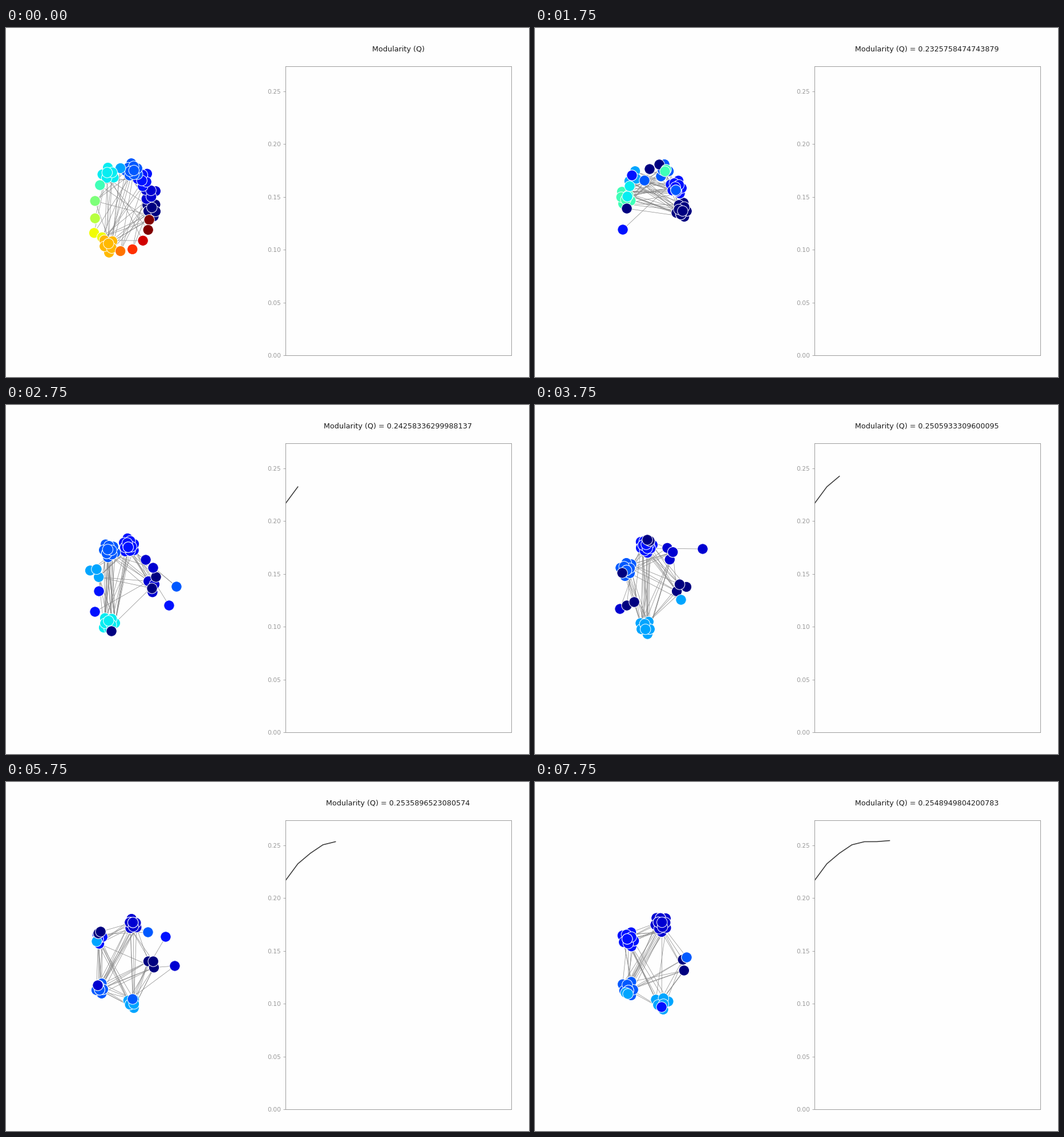
These frames come from a looping animation (917 by 611 pixels, 8 s). A matplotlib script:

```python
import numpy as np
import matplotlib.pyplot as plt
from matplotlib.animation import FuncAnimation
from matplotlib.collections import LineCollection

W, H, DPI = 917, 611, 64
PT = 72 / DPI  # points per pixel
NODES, EDGES = 50, 46
JET = plt.get_cmap("jet")(np.linspace(0, 1, 15))
Q_TEXT = ["0.2164823309600412", "0.2325758474743879", "0.24258336299988137",
          "0.2505933309600095", "0.2535303192120565", "0.2535896523080574",
          "0.25456230814005213", "0.2548949804200783"]
Q = [float(q) for q in Q_TEXT]
KEY_FRAMES = [1, 7, 11, 15, 19, 23, 31]


def blob(slot, slots, count, radius, rng):
    """Points of one community around its place on the ring."""
    angle = 2 * np.pi * slot / slots
    center = np.array([206 + 51 * np.cos(angle), 318 - 73 * np.sin(angle)])
    if count == 1:
        return center[None]
    j = np.arange(count)[::-1]
    r = radius * np.sqrt((j + 0.5) / count)
    turn = 2.4 * j + rng.uniform(0, 2 * np.pi)
    return center + np.column_stack([r * np.cos(turn), 1.15 * r * np.sin(turn)])


class Pose:
    """Community sizes by ring slot, plus nodes (colour, x, y) away from their group."""

    def __init__(self, slots, sizes, strays=(), colors=None, radius=12):
        rng = np.random.default_rng(slots)
        colors = colors or range(len(sizes))
        points, tints = [], []
        for slot, (size, color) in enumerate(zip(sizes, colors)):
            points.extend(blob(slot, slots, size, radius, rng) if size else [])
            tints += [color] * size
        for color, x, y in strays:
            points.append((x, y))
            tints.append(color)
        pick = np.arange(NODES) * len(points) // NODES
        self.xy = np.array(points)[pick]
        self.colors = JET[np.array(tints)[pick]]
        gap = np.linalg.norm(self.xy[:, None] - self.xy, axis=2)
        crowd = sum(sizes) * NODES // len(points)
        far = np.argwhere(np.triu(gap > 60)[:crowd, :crowd])
        self.edges = far[rng.choice(len(far), EDGES, replace=False)]
        links = [(i, rng.integers(crowd)) for i in range(crowd + 1, NODES)]
        if links:
            self.edges = np.vstack([self.edges, links])


POSES = [
    Pose(15, [6, 5, 6, 10, 1, 6, 1, 1, 1, 2, 6, 1, 1, 1, 2]),
    Pose(11, [9, 9, 4, 0, 3, 6],
         [(3, 247, 284), (0, 218, 239), (6, 230, 248), (6, 228, 251), (0, 201, 247),
          (2, 170, 258), (3, 192, 267), (5, 166, 277), (5, 162, 295), (0, 161, 316),
          (2, 154, 353)], colors=[0, 2, 3, 0, 4, 6]),
    Pose(9, [3, 1, 11, 10, 3, 0, 8],
         [(3, 299, 318), (2, 286, 351), (0, 263, 301), (0, 256, 321), (1, 258, 285),
          (2, 163, 326), (2, 156, 362), (0, 185, 396)], colors=[1, 1, 2, 3, 4, 0, 5]),
    Pose(7, [3, 3, 12, 9, 0, 7],
         [(1, 294, 252), (4, 256, 341), (0, 201, 238), (0, 197, 236), (0, 153, 294),
          (1, 149, 357), (0, 161, 351), (0, 174, 345)], colors=[0, 1, 2, 3, 0, 4]),
    Pose(6, [6, 7, 8, 6, 7],
         [(2, 315, 263), (2, 313, 356), (1, 262, 332), (1, 266, 337), (0, 227, 267),
          (0, 174, 251), (4, 150, 320)], radius=11),
    Pose(5, [3, 7, 4, 6, 5],
         [(1, 296, 322), (2, 280, 271), (3, 249, 263), (4, 159, 279), (0, 162, 265),
          (0, 166, 262), (1, 161, 356), (3, 222, 380)], radius=9),
    Pose(5, [2, 11, 9, 7, 6],
         [(3, 266, 307), (4, 159, 369), (4, 163, 371), (2, 222, 394)], radius=13),
]

plt.rcParams["font.family"] = "DejaVu Sans"
fig = plt.figure(figsize=(W / DPI, H / DPI), dpi=DPI, facecolor="#fefefe")

graph = fig.add_axes([0, 0, 1, 1])
graph.set(xlim=(0, W), ylim=(H, 0))
graph.axis("off")
edges = graph.add_collection(
    LineCollection([], colors="#888888", linewidths=0.7 * PT, zorder=1))
nodes = graph.scatter(*POSES[0].xy.T, s=(18.4 * PT) ** 2, c=POSES[0].colors,
                      edgecolors="white", linewidths=PT, zorder=2)
title = graph.text(687.5, 41, "", ha="center", va="baseline",
                   fontsize=12.75 * PT, color="#1c1c1c")

chart = fig.add_axes([489.7 / W, 1 - 573 / H, 395.8 / W, 506.5 / H], facecolor="#fefefe")
chart.set(xlim=(0, 18), ylim=(0, 0.2741), xticks=[])
levels = np.arange(6) * 0.05
chart.set_yticks(levels, [f"{v:.2f}" for v in levels])
chart.tick_params(axis="y", color="#999999", labelcolor="#999999", labelsize=10.65 * PT,
                  length=3.7 * PT, width=0.85 * PT, pad=3.7 * PT)
for spine in chart.spines.values():
    spine.set(color="#999999", linewidth=0.95 * PT)
curve, = chart.plot([], [], color="#3c3c3c", lw=1.6 * PT)


def positions(frame):
    t = np.interp(frame, KEY_FRAMES, range(len(POSES)))
    a = int(t)
    b = min(a + 1, len(POSES) - 1)
    return POSES[a].xy + (t - a) * (POSES[b].xy - POSES[a].xy)


def update(frame):
    step = (frame - 2) // 4  # a new partition every four frames
    shown = max(step, 0)
    pose = POSES[min(shown, len(POSES) - 1)]
    xy = positions(frame)
    nodes.set_offsets(xy)
    nodes.set_facecolors(pose.colors)
    edges.set_segments(xy[pose.edges])
    title.set_text("Modularity (Q)" + (f" = {Q_TEXT[step]}" if step >= 0 else ""))
    curve.set_data(range(shown), Q[:shown])
    return nodes, edges, title, curve


anim = FuncAnimation(fig, update, frames=32, interval=250, repeat=True, repeat_delay=0)
plt.show()
```
